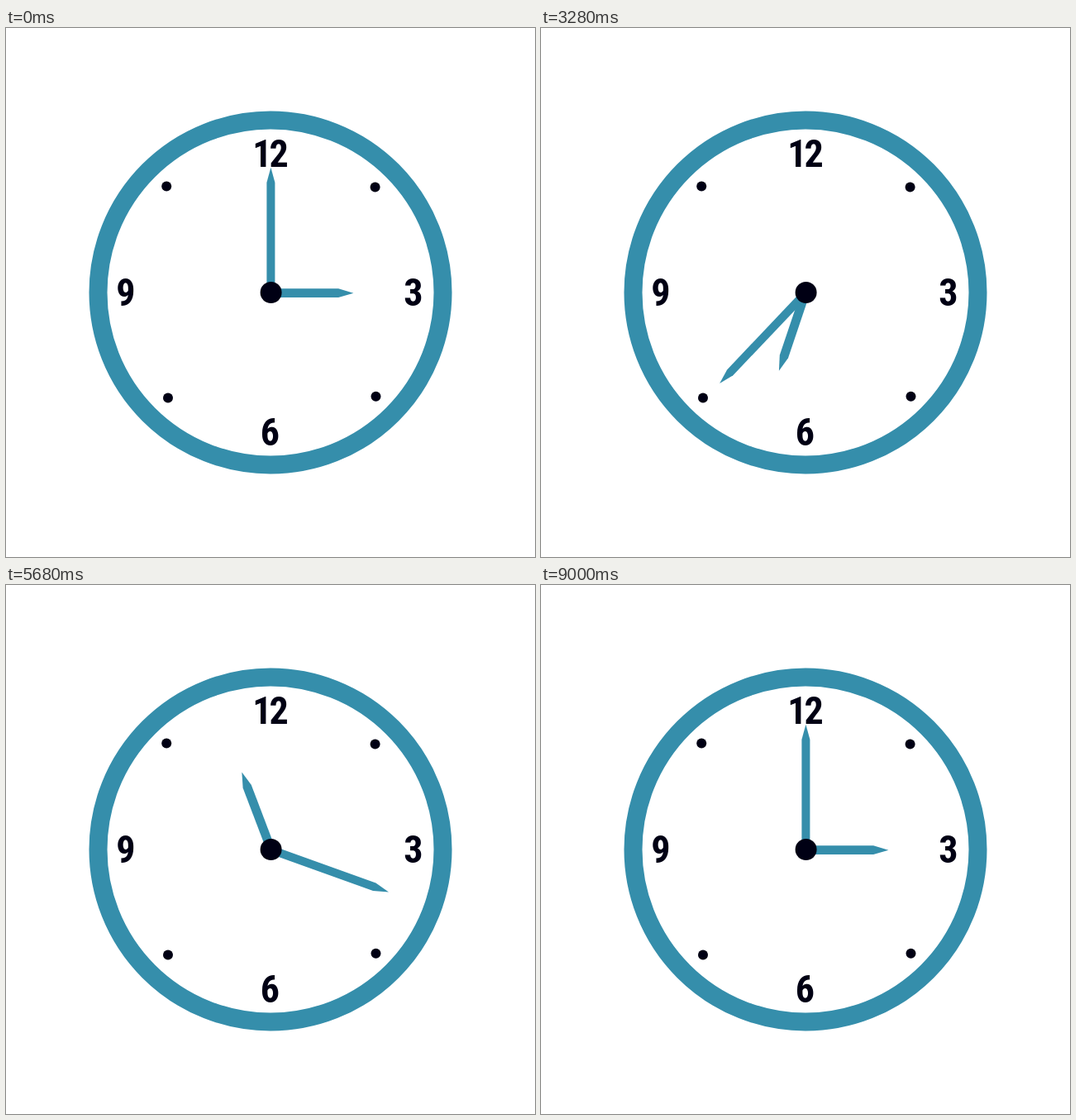
Write an HTML page that moves like this. It is 640 px wide and 640 px high and loops after 10000 ms.

```html
<!DOCTYPE html>
<html lang="en">
<head>
<meta charset="utf-8">
<title>Clock</title>
<style>
  html, body { margin: 0; width: 100%; height: 100%; overflow: hidden; background: #fff; }
  svg { display: block; width: 100%; height: 100%; }
  .ring { fill: none; stroke: #358eab; stroke-width: 22; }
  .hand { fill: #358eab; }
  .ink { fill: #000014; }
  text {
    font: 700 46px "Roboto Condensed", Roboto, "Liberation Sans", sans-serif;
    font-stretch: 75%;
    letter-spacing: -3px;
    text-anchor: middle;
  }
</style>
</head>
<body>
<svg viewBox="0 0 640 640">
  <circle class="ring" cx="320" cy="320" r="208.5"/>
  <g class="ink">
    <text x="318.5" y="168">12</text>
    <text x="491.5" y="336">3</text>
    <text x="318" y="505">6</text>
    <text x="143.5" y="336">9</text>
    <circle cx="194.2" cy="191.5" r="6"/>
    <circle cx="446.6" cy="192.4" r="6"/>
    <circle cx="447.5" cy="445.8" r="6"/>
    <circle cx="196" cy="447.6" r="6"/>
  </g>
  <g transform="translate(320.4 320.2)">
    <path id="hour" class="hand" d="M0-5H81.8L100 .6L81.8 5.8H0Z"/>
    <path id="minute" class="hand" d="M-5 0V-133.2L0-151.5L5-133.2V0Z"/>
  </g>
  <circle class="ink" cx="320.6" cy="320" r="13"/>
</svg>
<script>
  const LOOP = 10000, TURN = 9000, STEP = 40;
  const hour = document.getElementById('hour');
  const minute = document.getElementById('minute');

  // cubic-bezier(.333, 0, .667, 1), solved to first order
  function ease(x) {
    const s = x + 0.001 * x * (1 - x) * (1 - 2 * x);
    return s * s * (3 - 2 * s);
  }

  function rotate(hand, turns) {
    hand.setAttribute('transform', `rotate(${turns * 360})`);
  }

  function draw(ms) {
    const t = Math.floor((ms % LOOP + 1) / STEP) * STEP % LOOP;
    const turns = ease(Math.min(t / TURN, 1));
    rotate(hour, turns);
    rotate(minute, turns * 12);
  }

  function tick() {
    draw(performance.now());
    requestAnimationFrame(tick);
  }
  tick();
</script>
</body>
</html>
```
